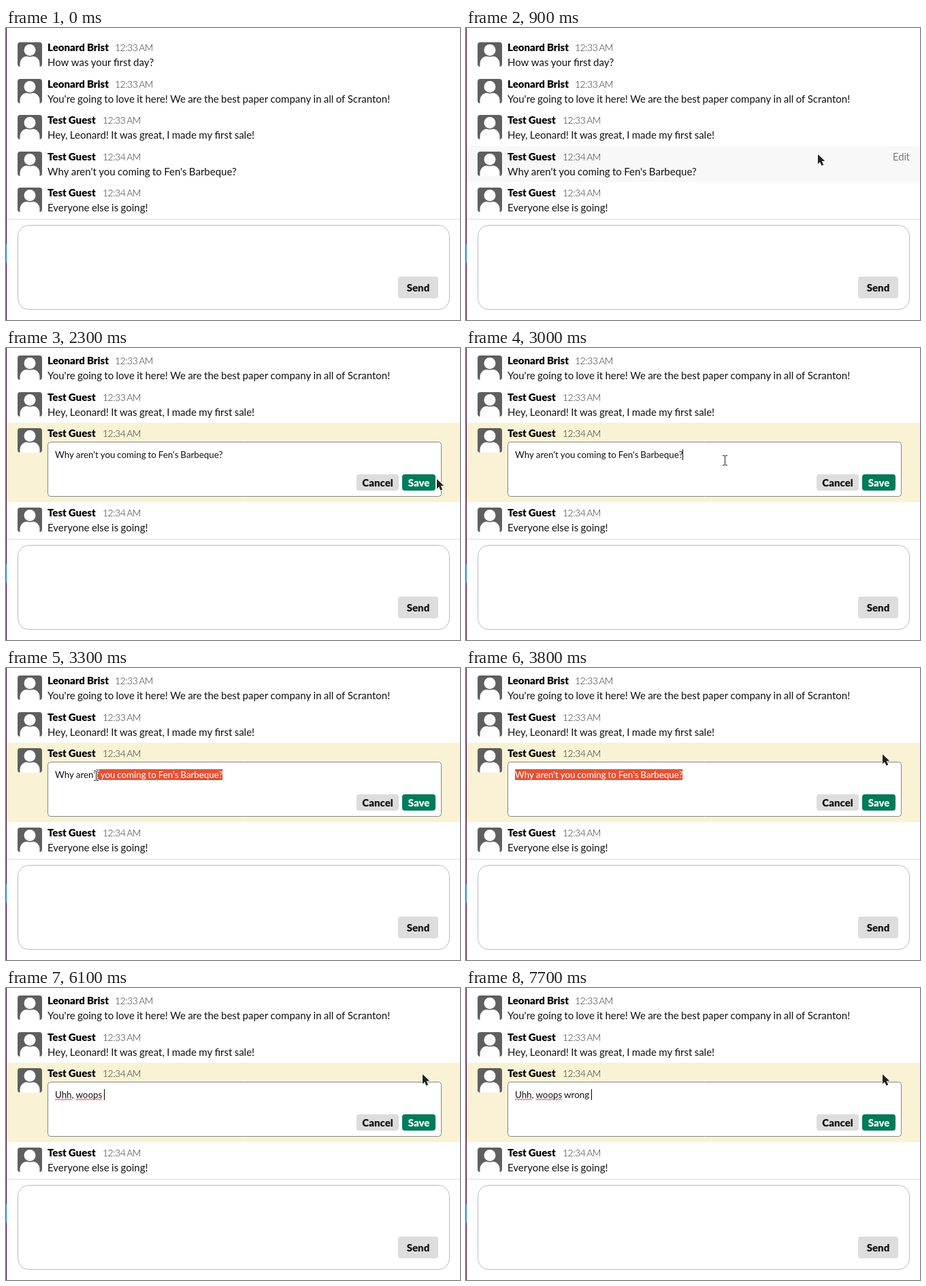
These frames come from a looping animation (667x430 px, 8000 ms). An HTML page with a canvas:

```html
<!DOCTYPE html>
<html lang="en">
<head>
<meta charset="utf-8">
<title>Editing a chat message</title>
<style>
  html, body { margin: 0; width: 667px; height: 430px; overflow: hidden; background: #fff; }
  canvas { display: block; }
</style>
</head>
<body>
<canvas id="stage" width="667" height="430"></canvas>
<script>
const ctx = document.getElementById('stage').getContext('2d');
const LOOP = 8000, STEP = 100;
const EDIT_START = 2300, CARET_START = 2800, SELECT_START = 3200, TYPE_START = 4700;

const BODY = '15px Lato, sans-serif';
const BLACK = '900 15px Lato, sans-serif';
const TIME = '300 14px Lato, sans-serif';
const LINK = '300 15px Lato, sans-serif';
const FIELD = '13.333px Lato, sans-serif';

const BOSS = 'Leonard Brist', ME = 'Test Guest';
const BEFORE = "Why aren't you coming to Fen's Barbeque?";
// keys pressed in each step, parted by bars
const KEYS = 'U||hh|||,|| |wo||||op|s| ||w|r|o||n||g|||||||| '.split('|');

const messages = [
  { who: BOSS, at: '12:33 AM', text: 'How was your first day?' },
  { who: BOSS, at: '12:33 AM', text: "You're going to love it here! We are the best paper company in all of Scranton!" },
  { who: ME, at: '12:33 AM', text: 'Hey, Leonard! It was great, I made my first sale!' },
  { who: ME, at: '12:34 AM', text: BEFORE },
  { who: ME, at: '12:34 AM', text: 'Everyone else is going!' }
];
const EDITED = 3;

const pointerStart = { x: 575, y: 11 };
const moves = [
  { from: 600, to: 1000, x: 505, y: 217 },
  { from: 1300, to: 1900, x: 632, y: 192 },
  { from: 2300, to: 3000, x: 380, y: 165 },
  { from: 3100, to: 3400, x: 45, y: 155 },
  { from: 3400, to: 3600, x: 149, y: 129 },
  { from: 3700, to: 3800, x: 611, y: 126 }
];

function text(str, x, y, font, color = '#000', align = 'left') {
  ctx.font = font;
  ctx.fillStyle = color;
  ctx.textAlign = align;
  ctx.fillText(str, x, y);
}

function rect(x, y, w, h, color) {
  ctx.fillStyle = color;
  ctx.fillRect(x, y, w, h);
}

function roundBox(x, y, w, h, r, fill, stroke) {
  ctx.beginPath();
  ctx.roundRect(x, y, w, h, r);
  ctx.fillStyle = fill;
  ctx.fill();
  if (stroke) {
    ctx.strokeStyle = stroke;
    ctx.lineWidth = 1;
    ctx.stroke();
  }
}

function circle(x, y, r, color) {
  ctx.beginPath();
  ctx.arc(x, y, r, 0, Math.PI * 2);
  ctx.fillStyle = color;
  ctx.fill();
}

function button(label, x, y, w, h, fill, color) {
  roundBox(x, y, w, h, 4, fill);
  text(label, x + w / 2, y + h / 2 + 6, BLACK, color, 'center');
}

function fieldWidth(str) {
  ctx.font = FIELD;
  return ctx.measureText(str).width;
}

// wavy spelling mark below a word of the field
function markWord(value, word, color) {
  const from = 72 + fieldWidth(value.slice(0, value.indexOf(word)));
  const to = from + fieldWidth(word);
  ctx.beginPath();
  for (let x = from; x <= to; x += 0.5) ctx.lineTo(x, 164 + Math.sin(x * Math.PI / 2));
  ctx.strokeStyle = color;
  ctx.lineWidth = 1;
  ctx.stroke();
}

function avatar(y) {
  const gray = '#5f5f5f';
  ctx.save();
  ctx.beginPath();
  ctx.roundRect(17, y, 36, 36, 4);
  ctx.clip();
  rect(17, y, 36, 36, gray);
  roundBox(20.5, y + 20.5, 29, 26, 11, '#fff');
  circle(35, y + 11.5, 10, gray);
  circle(35, y + 11.5, 8.5, '#fff');
  ctx.restore();
}

function pointerAt(t) {
  if (t < moves[0].from) return null;
  let { x, y } = pointerStart;
  for (const m of moves) {
    const u = Math.min(1, Math.max(0, (t - m.from) / (m.to - m.from)));
    const k = u * u * (3 - 2 * u);
    x += (m.x - x) * k;
    y += (m.y - y) * k;
  }
  return { x: Math.round(x), y: Math.round(y) };
}

function pointerKind(t, { x, y }) {
  if (t < EDIT_START) return x >= 626 && y >= 184 && y < 200 ? 'hand' : 'arrow';
  if (y >= 186 && y < 210 && x >= 515 && x <= 631) return 'hand';
  return y >= 138 && x < 631 ? 'beam' : 'arrow';
}

const pointers = {
  arrow() {
    const side = [[13, 5.6], [11.5, 1.5], [17.5, 1.5]];
    const mirrored = side.map(([x, y]) => [x, -y]).reverse();
    ctx.translate(1, 1);
    ctx.rotate(1.17);
    ctx.beginPath();
    ctx.moveTo(0, 0);
    [...side, ...mirrored].forEach(([x, y]) => ctx.lineTo(x, y));
    ctx.closePath();
    ctx.lineJoin = 'round';
    ctx.strokeStyle = '#fff';
    ctx.lineWidth = 2;
    ctx.stroke();
    ctx.fillStyle = '#222';
    ctx.fill();
  },
  hand() {
    for (const [grow, color] of [[1.2, '#222'], [0, '#fff']]) {
      const part = (x, y, w, h, r) =>
        roundBox(x - grow, y - grow, w + 2 * grow, h + 2 * grow, r + grow, color);
      part(-3, 9, 5, 4, 2);
      part(0, 9, 10.5, 7, 2);
      for (let i = 0; i < 4; i++) {
        const top = i ? 5.5 + i * 0.5 : 0.5;
        part(0.5 + i * 2.8, top, 2.1, 14 - top, 1);
      }
    }
  },
  beam() {
    for (const [grow, color] of [[1, '#fff'], [0, '#222']]) {
      const bar = (x, y, w, h) => rect(x - grow, y - grow, w + 2 * grow, h + 2 * grow, color);
      bar(0, -6, 1, 13);
      for (const y of [-7, 7]) for (const x of [-3, 1]) bar(x, y, 3, 1);
    }
  }
};

function drawPointer(t, pos) {
  ctx.save();
  ctx.translate(pos.x, pos.y);
  pointers[pointerKind(t, pos)]();
  ctx.restore();
}

function drawTime(m, y) {
  ctx.letterSpacing = '-0.5px';
  ctx.wordSpacing = '-1.5px';
  text(m.at, m.who === BOSS ? 160 : 142, y + 13, TIME, '#333');
  ctx.letterSpacing = '0px';
  ctx.wordSpacing = '-0.5px';
}

function drawMessage(m, i, t, pos) {
  const editing = t >= EDIT_START;
  const lift = editing && i <= EDITED ? 63.5 : 0;
  const y = Math.floor(21.5 + 53.5 * i - lift);
  const hovered = !editing && pos && pos.y >= y - 8 && pos.y < y + 45;
  if (hovered) rect(1, y - 8, 666, 53, '#f8f8f8');

  const open = editing && i === EDITED;
  if (open) rect(1, 110, 666, 117, '#faf2d5');
  avatar(y);
  text(m.who, 61, y + 13, BLACK);
  drawTime(m, y);
  if (open) drawEditor(t, pos);
  else text(m.text, 61, y + 35, BODY, '#111');

  if (hovered && m.who === ME) {
    text('Edit', 652, y + 13, LINK, '#222', 'right');
    if (pointerKind(t, pos) === 'hand') rect(626, y + 14, 26, 1, '#444');
  }
}

function drawSelection(pos) {
  const end = 72 + fieldWidth(BEFORE);
  const start = pos.y < 149 || pos.x > end ? 72 : Math.max(72, pos.x);
  ctx.save();
  ctx.beginPath();
  ctx.rect(start, 149, end - start, 16);
  ctx.clip();
  rect(start, 149, end - start, 16, '#e35335');
  text(BEFORE, 72, 162, FIELD, '#fff');
  ctx.restore();
  markWord(BEFORE, 'Barbeque', '#c2331c');
}

function drawEditor(t, pos) {
  roundBox(61.5, 138.5, 578, 80, 4, '#fff', '#868686');
  button('Cancel', 515, 186, 62, 24, '#ddd', '#111');
  button('Save', 582, 186, 49, 24, '#007a5a', '#fff');

  const typing = t >= TYPE_START;
  const value = typing ? KEYS.slice(0, (t - TYPE_START) / STEP + 1).join('') : BEFORE;
  text(value, 72, 162, FIELD, '#111');
  if (value.startsWith('Uhh, ')) markWord(value, 'Uhh', '#e02020');
  if (value.includes('woops ')) markWord(value, 'woops', '#e02020');

  if (t >= SELECT_START && !typing) drawSelection(pos);
  else if (t >= CARET_START) rect(Math.floor(72 + fieldWidth(value)), 149, 1, 16, '#000');
}

function drawComposer() {
  rect(1, 281, 666, 149, '#fff');
  rect(1, 281, 666, 1, '#ddd');
  roundBox(17.5, 290.5, 634, 124, 16, '#fff', '#bbb');
  button('Send', 576, 366, 59, 32, '#ddd', '#111');
  rect(0, 0, 1, 430, '#3f0e40');
  rect(0, 318, 1, 28, '#1f86c4');
}

function draw(t) {
  rect(0, 0, 667, 430, '#fff');
  ctx.wordSpacing = '-0.5px';
  const pos = pointerAt(t);
  messages.forEach((m, i) => drawMessage(m, i, t, pos));
  drawComposer();
  if (pos) drawPointer(t, pos);
}

const began = performance.now();
function tick() {
  const t = (performance.now() - began) % LOOP;
  draw(Math.floor(t / STEP) * STEP);
  requestAnimationFrame(tick);
}
tick();
</script>
</body>
</html>
```
